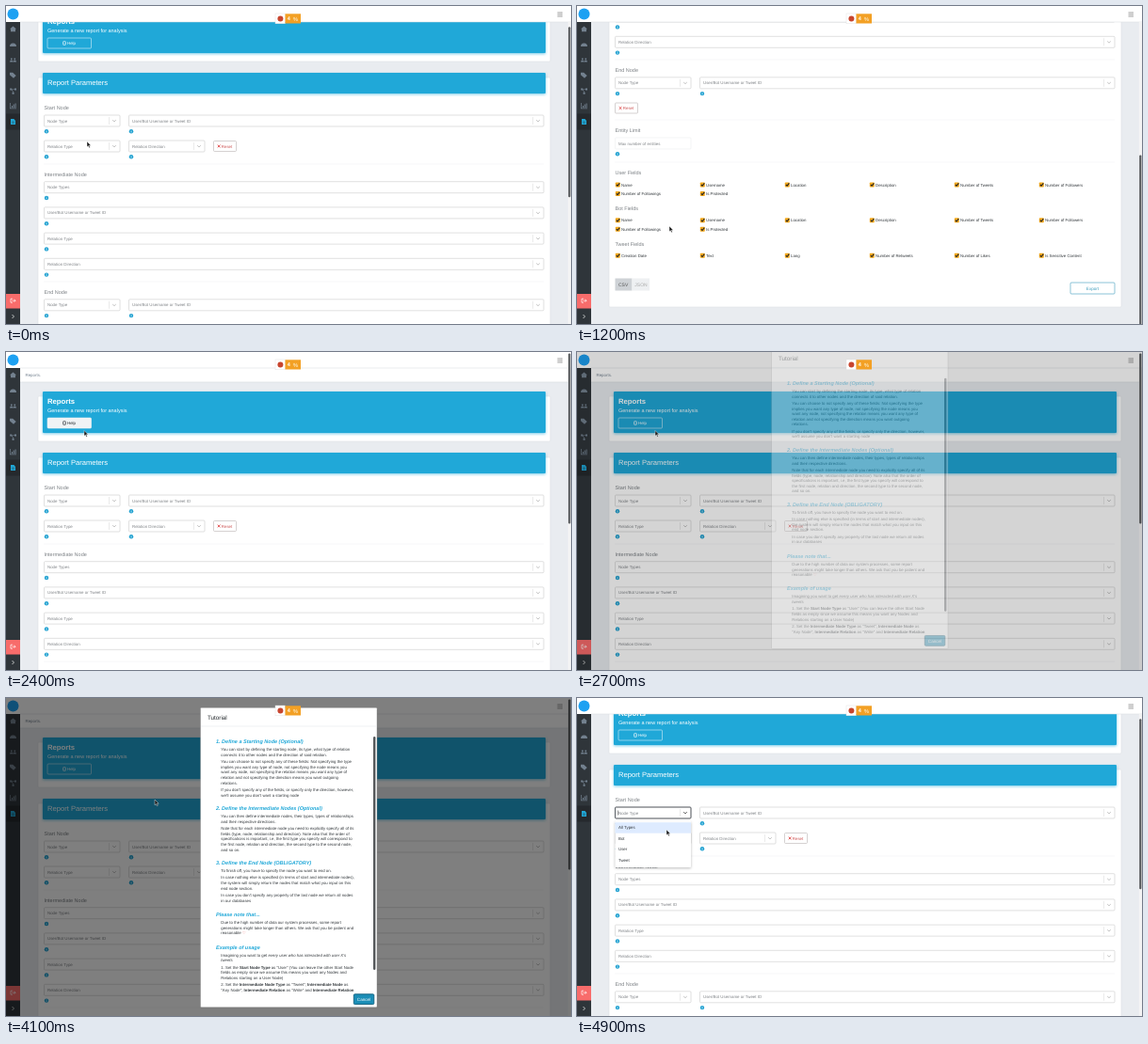
These frames come from a looping animation (600x338 px, 5000 ms). An HTML page:

```html
<!DOCTYPE html>
<html lang="en">
<head>
<meta charset="utf-8">
<title>Report builder</title>
<style>
  html, body { margin: 0; width: 100%; height: 100%; overflow: hidden; background: #fff; }
  svg { display: block; width: 600px; height: 338px; }
  text { font-family: "Liberation Sans", Arial, sans-serif; text-rendering: geometricPrecision; white-space: pre; }
  .b { font-weight: bold; }
  .i { font-style: italic; }
  .banner { filter: drop-shadow(0 1px 1.5px #20a8d899); }
  .menu { filter: drop-shadow(0 1px 1.5px #0004); }
</style>
</head>
<body>
<svg id="stage" viewBox="0 0 600 338"></svg>
<script>
const BLUE = '#20a8d8', GREY = '#808488', INK = '#33383c';

const rect = (x, y, w, h, fill, more = '') =>
  `<rect x="${x}" y="${y}" width="${w}" height="${h}" fill="${fill}" ${more}/>`;
const disc = (x, y, r, fill) => `<circle cx="${x}" cy="${y}" r="${r}" fill="${fill}"/>`;
const line = (d, stroke, width = .6) =>
  `<path d="${d}" fill="none" stroke="${stroke}" stroke-width="${width}"/>`;
// y is the middle of the line of text
const text = (x, y, s, size = 4.4, fill = GREY, more = '') =>
  `<text x="${x}" y="${y + size * .36}" font-size="${size}" fill="${fill}" ${more}>${s}</text>`;

const box = (x, y, w, h, stroke, fill = '#fff', width = .6) =>
  rect(x, y, w, h, fill, `stroke="${stroke}" stroke-width="${width}" rx="1"`);
const chevron = (x, y, stroke) => line(`M${x - 1.8} ${y - .8}l1.8 1.7 1.8-1.7`, stroke, .7);
const info = (x, y) => disc(x, y, 2.2, '#1b9fd0') + rect(x - .35, y - .4, .7, 1.6, '#fff') + disc(x, y - 1.1, .4, '#fff');
const select = (x, y, right, label) =>
  box(x, y - 6, right - x, 12, '#ccc') + text(x + 3.5, y, label) +
  line(`M${right - 11.5} ${y - 4}v8`, '#d4d4d4', .5) + chevron(right - 6, y, '#aaa') + info(x + 2.5, y + 11.3);
const small = (x, y, label) => select(x, y, x + 80.5, label);
const wide = (x, y, label) => select(x, y, 571, label);
const heading = (y, s) => text(40.5, y, s, 5.5, '#7c8085');
const rule = y => line(`M40 ${y}H571`, '#eceef0', .5);
const reset = (x, y) => box(x, y - 5.5, 24, 11, '#b9b2b2') +
  line(`M${x + 4.2} ${y - 1.4}l2.8 2.8m0-2.8l-2.8 2.8`, '#e04848', .9) + text(x + 8.3, y, 'Reset', 4.4, '#c55');

const checks = (y, labels) => labels.map((s, i) => {
  const x = 40.8 + i % 6 * 90, cy = y + (i > 5 ? 9.5 : 0);
  return rect(x, cy - 2.5, 5, 5, '#f2a81d', 'rx=".8"') +
    line(`M${x + 1} ${cy - .2}l1.3 1.4 2.2-2.8`, '#222', 1.1) + text(x + 6.2, cy, s, 4.35, INK);
}).join('');

const person = ['Name', 'Username', 'Location', 'Description', 'Number of Tweets',
  'Number of Followers', 'Number of Followings', 'Is Protected'];
const post = ['Creation Date', 'Text', 'Lang', 'Number of Retweets', 'Number of Likes', 'Is Sensitive Content'];
const who = 'User/Bot Username or Tweet ID';
const banner = (y, h) => rect(39, y, 534, h, BLUE, 'rx="1" class="banner"');
const card = (y, h) => box(34, y, 544, h, '#dde1e5');

const help = (fill, stroke, ink) => box(44, 70, 46.5, 11, stroke, fill) +
  box(60.5, 73.5, 3, 4, ink, 'none') + line('M61.3 75h1.5m-1.5 1.2h1.5', ink, .4) + text(65, 75.6, 'Help', 4.4, ink);

const options = rect(40.5, 131, 80.5, 49, '#fff', 'rx="1" class="menu"') +
  rect(40.5, 132.2, 80.5, 11.5, '#deebff') +
  ['All Types', 'Bot', 'User', 'Tweet'].map((s, i) => text(44, 137.7 + i * 11.6, s, 4.4, INK)).join('');

const page = rect(15, 17, 585, 620, '#e9ecf0') + rect(15, 17, 585, 15, '#fff') +
  line('M15 32H600', '#d5dade') + text(20.5, 24.8, 'Reports.', 4.4, '#73818f') +
  card(47, 48) + banner(42, 44) +
  text(44, 51.8, 'Reports', 7.7, '#fff', 'class="b"') +
  text(44, 62.3, 'Generate a new report for analysis', 5.5, '#fff') +
  `<g id="help">${help('none', '#d5eef8', '#fff')}</g>` +
  `<g id="hover">${help('#f0f3f5', '#f0f3f5', '#23282c')}</g>` +
  card(112, 480) + banner(107, 22) + text(44, 117.5, 'Report Parameters', 7.6, '#fff') +
  heading(144.3, 'Start Node') + small(40.5, 158, 'Node Type') + wide(130.5, 158, who) +
  small(40.5, 185, 'Relation Type') + small(130.5, 185, 'Relation Direction') + reset(220.5, 185) + rule(204) +
  heading(215.3, 'Intermediate Node') +
  ['Node Types', who, 'Relation Type', 'Relation Direction'].map((s, i) => wide(40.5, 228.7 + i * 27.2, s)).join('') +
  rule(329) + heading(340.2, 'End Node') + small(40.5, 353.8, 'Node Type') + wide(130.5, 353.8, who) +
  reset(40.5, 380.5) + rule(393) +
  heading(403.7, 'Entity Limit') + box(40.5, 412, 80.5, 12, '#eceef0') +
  text(44, 418, 'Max number of entities') + info(43, 429.2) + rule(438) +
  heading(449, 'User Fields') + checks(462, person) +
  heading(487, 'Bot Fields') + checks(499.8, person) +
  heading(525, 'Tweet Fields') + checks(537.3, post) +
  rect(40.5, 561.5, 18, 13, '#ced2d6') + text(44, 568.3, 'CSV', 5, '#555') +
  rect(58.5, 561.5, 18.5, 13, '#eef0f2') + text(61.3, 568.3, 'JSON', 5, '#aaa') +
  box(524, 566, 47, 12, '#3f9dbd') + text(547.5, 572, 'Export', 4.6, '#3f9dbd', 'text-anchor="middle"') +
  `<g id="menu"><g transform="translate(0 36)">${options}</g>` +
  box(40.5, 152, 80.5, 12, '#4a5056', 'none', .9) + line('M43.7 155.5v5', '#222', .5) + chevron(115, 158, '#444') + '</g>';

const icons = [
  'M4 24.5l3.5-3 3.5 3h-1v2.8h-5v-2.8z',
  'M4 43a3.5 3.5 0 1 1 7 0zm3-1l2-2',
  'M4 59.5q0-2 1.8-2t1.7 2q0-2 1.8-2t1.7 2zM5 55.5h1.6v1.5h-1.6zm3.5 0h1.6v1.5h-1.6z',
  'M4 70.7h3.2l3.5 3.3-2.7 2.7-4-3.4z',
  'M4.2 87.5h2v2h-2zm4.8 0h2v2h-2zm-2.4 4.2h2v2h-2zM6 88.3h3v.5h-3zm0 1l1.5 2.5.5-.4-1.3-2.3z',
  'M4 103v6.2h7v-.7h-6.3v-5.5zm2 3h1v2h-1zm1.8-1.5h1v3.5h-1zm1.8-1h1v4.5h-1z'
];
const frame = rect(0, 17, 15, 321, '#2f353a') + rect(0, 114.5, 15, 17, '#25292d') +
  `<path d="${icons.join('')}" fill="#73818f"/>` +
  `<path d="M5 120h3.3l1.7 1.7v4.3h-5z" fill="${BLUE}"/>` + line('M6 123h3m-3 1.3h3', '#25292d', .4) +
  rect(0, 306, 15, 15.5, '#f86c6b') + line('M7 311.2h-2v4h2m-.5-2h3.5m-1.4-1.5l1.5 1.5-1.5 1.5', '#fff', .7) +
  line('M6.5 328l2 2-2 2', '#fff', .7) +
  rect(0, 0, 600, 17, '#fff') + line('M15 17H600', '#d5dade', .5) + disc(7.5, 8.5, 6, '#1da1f2') +
  line('M585.5 7h5.5m-5.5 2h5.5m-5.5 2h5.5', '#777', .7) +
  rect(596.8, 17, 3.2, 321, '#f4f4f4') + rect(597.2, 1.5, 2.2, 181, '#55585b', 'id="thumb" rx="1"');

// *bold* and _italic_ marks
const mark = s => s.replace(/\*(.+?)\*/g, '<tspan class="b">$1</tspan>')
  .replace(/_(.+?)_/g, '<tspan class="i">$1</tspan>').replace('♡', '<tspan fill="#f05a5a">♡</tspan>');
const guide = [
  [46.2, '1. Define a Starting Node (Optional)',
    'You can start by defining the starting node, its type, what type of relation|connects it to other nodes and the direction of said relation.',
    'You can choose to not specify any of these fields: Not specifying the type|implies you want any type of node, not specifying the node means you|want any node, not specifying the relation means you want any type of|relation and not specifying the direction means you want outgoing|relations.',
    "If you don't specify any of the fields, or specify only the direction, however,|we'll assume you don't want a starting node"],
  [117.2, '2. Define the Intermediate Nodes (Optional)',
    'You can then define intermediate nodes, their types, types of relationships|and their respective directions.',
    'Note that for each intermediate node you need to explicitly specify all of its|fields (type, node, relationship and direction). Note also that the order of|specifications is important, i.e, the first type you specify will correspond to|the first node, relation and direction, the second type to the second node,|and so on.'],
  [175, '3. Define the End Node (OBLIGATORY)',
    'To finish off, you have to specify the node you want to end on.',
    'In case nothing else is specified (in terms of start and intermediate nodes),|the system will simply return the nodes that match what you input on this|end node section.',
    'In case you don\'t specify any property of the last node we return all nodes|in our databases'],
  [230.2, 'Please note that...',
    'Due to the high number of data our system processes, some report|generations might take longer than others. We ask that you be patient and|reasonable ♡'],
  [264.6, 'Example of usage',
    "Imagining you want to get _every user who has interacted with user X's_|_tweets_",
    '1. Set the *Start Node Type* as "User" (You can leave the other Start Node|fields as empty since we assume this means you want any Nodes and|Relations starting on a User Node)',
    '2. Set the *Intermediate Node Type* as "Tweet", *Intermediate Node* as|"Any Node", *Intermediate Relation* as "Write" and *Intermediate Relation*|*Direction* as "Ingoing"']
].map(([top, title, ...paras]) => {
  let y = top + 8.5, out = text(223, top, title, 5.5, BLUE, 'class="b i"');
  for (const p of paras) {
    for (const s of p.split('|')) { out += text(228.3, y, mark(s), 4.3, INK); y += 5.6; }
    y += 1.8;
  }
  return out;
}).join('');

const dialog = box(206.5, 10.3, 187.5, 318.5, '#777', '#fff', .4) + text(214, 20.3, 'Tutorial', 6.3, '#23282c') +
  line('M207 30H394', '#dfe3e6', .5) +
  `<g clip-path="url(#body)"><g id="guide">${guide}</g></g>` +
  rect(390, 41, 2.4, 248, '#55585b', 'id="guideThumb" rx="1.2"') +
  box(369.3, 314.8, 21.5, 10.7, '#14607d', '#1b8eb7', .9) +
  text(380, 320.2, 'Cancel', 4.6, '#fff', 'text-anchor="middle"');

const badge = rect(286, 8, 10.5, 10.8, '#fff', 'stroke="#ddd" stroke-width=".4"') + disc(291.4, 13.6, 3, '#c8452f') +
  rect(296.5, 8.3, 16.5, 10.2, '#f3a024') + text(298.8, 13.5, '4', 5.5, '#fff', 'class="b"') +
  text(304.8, 13.5, '%', 6, '#fbe0b0', 'class="b"');

document.getElementById('stage').innerHTML =
  '<clipPath id="body"><path d="M207 38.5H394V314H207z"/></clipPath>' +
  `<g id="page">${page}</g>${frame}` +
  `<g id="shade">${rect(0, 0, 600, 338, '#000', 'opacity=".5"')}</g><g id="dialog">${dialog}</g>${badge}` +
  '<path id="arrow" d="M0 0v5.8l1.3-1.2 1 2.1 1-.5-1-2h1.9z" fill="#1c1c1c" stroke="#fff" stroke-width=".4"/>' +
  `<g id="beam">${line('M-1.2-2.8h2.4m-1.2 0v5.6m-1.2 0h2.4', '#333', .6)}</g>`;

// [time, value] pairs, joined by straight lines
const scrollKeys = [[0, 36], [100, 60], [600, 233], [900, 272], [1500, 272], [1600, 230], [1800, 110], [2000, 0], [4300, 0], [4500, 36]];
const fadeKeys = [[2600, 0], [2900, 1], [4100, 1], [4300, 0]];
const guideKeys = [[3100, 0], [3200, 8], [3400, 8], [3600, 0]];
const xKeys = [[700, 86], [1200, 98], [1900, 98], [2300, 83], [2800, 83], [3100, 264], [3500, 264], [3900, 158], [4200, 158], [4600, 95]];
const yKeys = [[700, 144], [1200, 234], [1900, 234], [2300, 83.5], [2800, 83.5], [3100, 106], [3500, 106], [3900, 108], [4200, 108], [4600, 124], [4700, 124], [4900, 140]];

function at(t, keys) {
  const n = keys.findIndex(k => k[0] > t);
  if (n < 0) return keys[keys.length - 1][1];
  if (!n) return keys[0][1];
  const [t0, a] = keys[n - 1], [t1, b] = keys[n];
  return a + (b - a) * (t - t0) / (t1 - t0);
}

const el = id => document.getElementById(id);
const move = (id, x, y) => el(id).setAttribute('transform', `translate(${x} ${y})`);
const show = (id, on) => el(id).style.display = on ? '' : 'none';

function draw() {
  const t = Math.floor(performance.now() % 5000 / 100) * 100; // ten poses a second
  const scroll = at(t, scrollKeys), fade = at(t, fadeKeys), down = at(t, guideKeys);
  const x = at(t, xKeys), y = at(t, yKeys);
  const hover = t >= 2300 && t < 2700, beam = t >= 3000 && t < 3700;

  move('page', 0, -scroll);
  move('thumb', 0, scroll * .577);
  show('hover', hover);
  show('help', !hover);
  show('menu', t >= 4700);
  el('shade').style.opacity = el('dialog').style.opacity = fade;
  move('dialog', 0, (fade - 1) * 20);
  move('guide', 0, -down);
  move('guideThumb', 0, down);
  show('beam', beam);
  show('arrow', !beam);
  move(beam ? 'beam' : 'arrow', x, y);
  requestAnimationFrame(draw);
}
draw();
</script>
</body>
</html>
```
